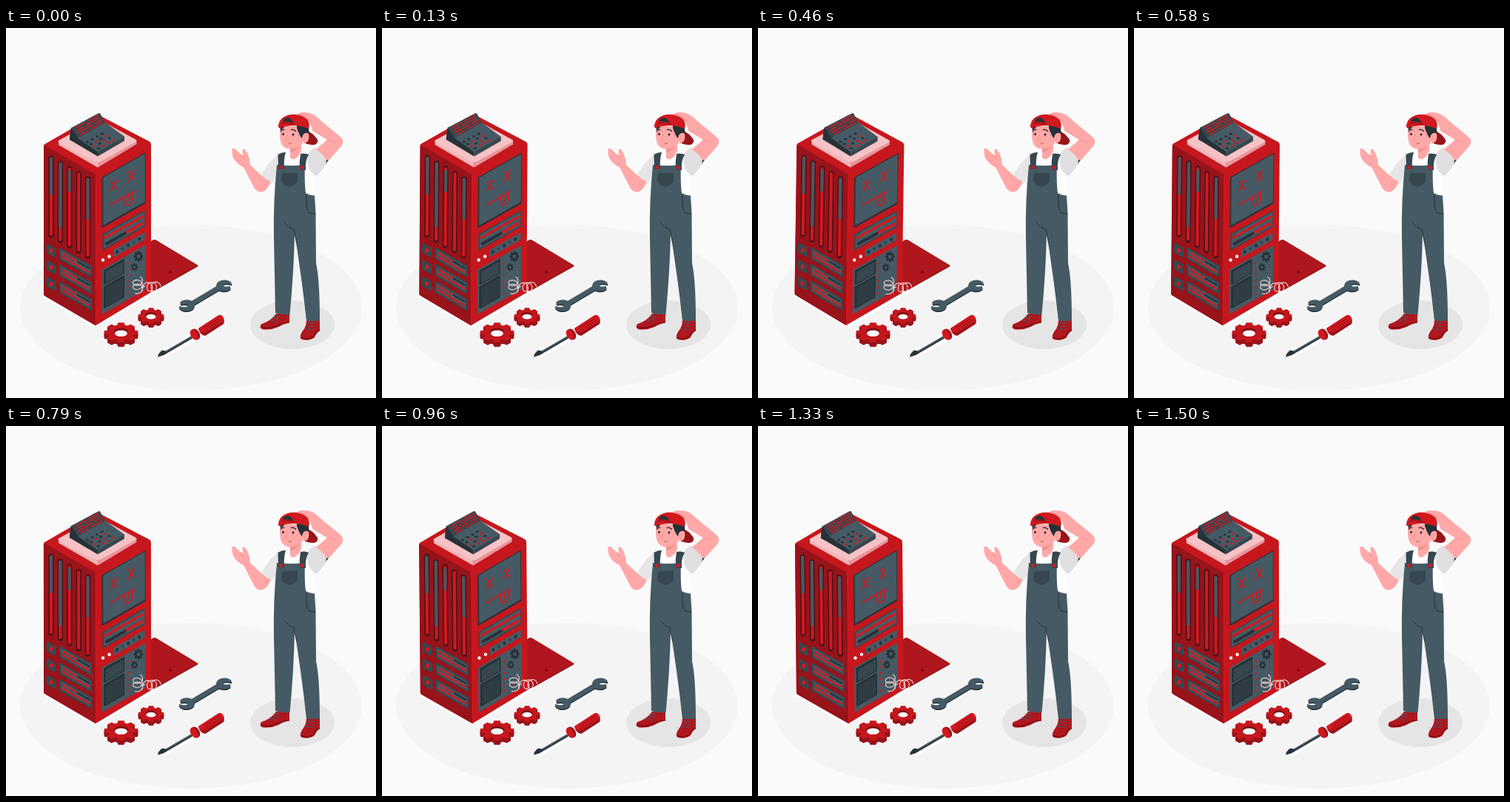
Write an HTML page that moves like this. It is 500 px wide and 500 px high and loops after 1540 ms.

```html
<!DOCTYPE html>
<html lang="en">
<head>
<meta charset="utf-8">
<title>Broken server</title>
<style>
html,body{margin:0;width:100%;height:100%;overflow:hidden;background:#fafafa}
svg{display:block;width:100vw;height:100vh}
</style>
</head>
<body>
<svg id="stage" viewBox="0 0 500 500" fill="none" stroke-linecap="round" stroke-linejoin="round"></svg>
<script>
const RED = '#d2191f', SIDE = '#c5171d', DEEP = '#98131a', WINE = '#7d0d13', SLATE = '#455a64', STEEL = '#37474f',
  INK = '#263238', SKIN = '#ffa8a7', SHADE = '#f28f8f', WIRE = '#f7d3d4', LOOP = 1540, SLOPE = 0.57;

const fill = (d, c, extra = '') => `<path d="${d}" fill="${c}" ${extra}/>`;
const line = (d, c, w = 1) => `<path d="${d}" stroke="${c}" stroke-width="${w}"/>`;
const oval = (x, y, rx, ry, c) => `<ellipse cx="${x}" cy="${y}" rx="${rx}" ry="${ry}" fill="${c}"/>`;
const dot = (x, y, r, c) => oval(x, y, r, r, c);
const range = (n, f) => Array.from({length: n}, (_, i) => f(i)).join('');

// Panels and bars lying on a side of the tower: dir 1 is the left side, -1 the right
const panel = (dir, x, y, w, h, c, r = 1) => {
  const k = dir * SLOPE * w;
  return fill(`M${x} ${y}l${w} ${k}v${h}l${-w} ${-k}z`, c, `stroke="${c}" stroke-width="${r}"`);
};
const bar = (dir, x, y, w, c, t) => line(`M${x} ${y}l${w} ${dir * SLOPE * w}`, c, t);

function cog(x, y, rx, ry, teeth, inner, turn = 0) {
  const pts = [], step = Math.PI * 2 / teeth;
  for (let i = 0; i < teeth; i++)
    [[-.34, inner], [-.22, 1], [.22, 1], [.34, inner]].forEach(([a, r]) => {
      const p = (i + a) * step + turn;
      pts.push((x + rx * r * Math.cos(p)).toFixed(1) + ' ' + (y + ry * r * Math.sin(p)).toFixed(1));
    });
  return 'M' + pts.join('L') + 'z';
}

function floorGear(x, y, rx, ry, depth, turn) {
  const shape = dy => cog(x, y + dy, rx, ry, 8, .77, turn);
  return fill(shape(depth + 1), '#fff', 'stroke="#fff" stroke-width="2"') +
    range(depth, i => fill(shape(depth - i), DEEP, `stroke="${DEEP}"`)) +
    fill(shape(0), SIDE, `stroke="${SIDE}"`) +
    oval(x, y - .5, rx * .43, ry * .43, WINE) +
    oval(x, y + 1.2, rx * .38, ry * .32, '#fafafa');
}

function coil(x, y, dx, dy, turns, rx, ry, from = 0) {
  const n = turns * 20;
  let d = '';
  for (let i = 0; i <= n; i++) {
    const a = from + i / 20 * Math.PI * 2, p = i / n;
    d += (i ? 'L' : 'M') + (x + dx * p + rx * Math.cos(a)).toFixed(1) + ' ' + (y + dy * p + ry * Math.sin(a)).toFixed(1);
  }
  return line(d, WIRE, 1.1);
}

function ground() {
  return oval(250, 378, 231, 112, '#f4f4f4') + oval(387, 401, 57, 33, '#e5e5e5') +
    line('M50 363L121 404L200 358', '#fff', 2) +
    line('M201 356L260 322', '#fff', 2) +
    fill('M150 318.500L198 287Q201 285.500 204 287.500L258 320Q261 321.500 258 323L202 354.500Q198 356.500 194 354z', WINE) +
    fill('M150 318L198 287Q201 285.500 204 287.500L258 320Q260.500 321 258 322L202 353.500Q198 355.500 194 353z', '#b0161d') +
    oval(222, 330, 2.3, 1.8, WINE);
}

function keypad() {
  const dark = [1, 4, 6, 9, 11, 12];
  return fill('M89 134Q87 136 86 151L124 173.500V167L97 148z', INK) +
    fill('M124 167L160 146V152.500L124 173.500z', STEEL) +
    fill('M96 148L133 127L160 146.500L124 167.500z', SLATE) +
    fill('M88 135L125 115.200Q126.500 114.700 127.500 116L134 128L97 149z', STEEL) +
    fill('M88 135L86 151L90 153L97 149z', INK) +
    bar(-1, 94, 135, 13, RED, 1.6) + bar(-1, 111, 125.500, 14, RED, 1.6) +
    bar(-1, 96, 138.500, 8, RED, 1.6) + bar(-1, 108, 131.500, 18, RED, 1.6) +
    bar(-1, 98, 141.500, 19, RED, 1.6) + bar(-1, 121, 128.500, 8, RED, 1.6) +
    bar(-1, 101, 144.500, 10, RED, 1.6) + bar(-1, 115, 136.500, 15, RED, 1.6) +
    range(16, i => {
      const u = i % 4, v = i >> 2;
      const c = v === 0 || dark.includes(i) ? INK : RED;
      return oval(110 + u * 6.6 + v * 5, 154 - u * 3.7 + v * 2.9, 2.1, 1.4, c);
    });
}

function leftSide() {
  // Each slot holds a dark stretch: [start, end] below the slot top
  const gaps = [[0, 51], [0, 88], [3, 33], null, [0, 56]];
  return gaps.map((g, i) => {
    const x = 61 + 12.4 * i, y = 173 + 7 * i;
    return line(`M${x} ${y + 3}V${y + 107}`, '#45141b', 7) +
      line(`M${x} ${y + 3.5}V${y + 106}`, RED, 4) +
      (g ? line(`M${x} ${y + 3.5 + g[0]}V${y + g[1]}`, SLATE, 4) : '');
  }).join('') + range(3, i => {
    const y = i * 22.5;
    return panel(1, 56, 293 + y, 10, 10, STEEL, 3) +
      oval(61, 301 + y, 2.5, 3, RED) +
      panel(1, 73, 298 + y, 42, 14, STEEL, 2) +
      panel(1, 74.5, 300.5 + y, 39, 10.5, SLATE, .5) +
      bar(1, 77, 304.500 + y, 19, RED, 2.2) + bar(1, 97, 316 + y, 15, INK, 2.2) +
      bar(1, 76, 309.500 + y, 21, RED, 2.4) + bar(1, 97, 321.500 + y, 15, RED, 2.4);
  });
}

function rightSide() {
  const face = 'M142 207l8 11M150 205l-8 15M165.500 194l7.500 11M173 192l-7.500 15' +
    'M141 239L174 220M160.500 229v7q.5 5.500 5.500 2.500q5-3 5-8v-8M166 226v7';
  return panel(-1, 130, 202, 58, 67.500, INK) +
    panel(-1, 131.500, 202, 56, 64.500, SLATE, .5) +
    line(face, RED, 1.7) +
    panel(-1, 131, 279, 56, 21, STEEL) +
    panel(-1, 132.500, 279.500, 54, 18, SLATE, .5) +
    bar(-1, 134, 283.500, 50, RED, 3.2) +
    bar(-1, 136, 291.500, 25, INK, 4) + bar(-1, 164, 275.500, 19, RED, 4) +
    dot(131, 313.500, 2.2, '#fff') + dot(139.500, 308.700, 2.2, '#fff') +
    panel(-1, 146, 300, 41, 9, SLATE) +
    range(5, i => oval(150 + i * 7.6, 302.500 - i * 4.330, 2, 2.4, i % 2 ? STEEL : INK)) +
    panel(-1, 130, 327, 58, 59, SLATE) +
    panel(-1, 133, 328, 26, 18, INK, 2) + panel(-1, 135, 329.5, 23, 14.5, STEEL) +
    panel(-1, 133, 350, 26, 28, INK, 2) + panel(-1, 135, 351.5, 23, 24.5, '#303c43') +
    range(6, i => oval(164.5, 318 + i * 8, 1.3, 1.6, RED)) +
    fill(cog(179, 308.500, 6.5, 7.5, 8, .74), INK) + oval(179, 308.500, 2.2, 2.7, SLATE) +
    fill(cog(173.500, 323, 4.7, 5.6, 8, .74), INK) + oval(173.500, 323, 1.6, 1.9, SLATE);
}

function tower() {
  return fill('M51 160Q51 157 54 156L120 118Q123 116.500 126 118L193 153Q196 154.500 196 157V357L121 402L51 361z', SIDE) +
    fill('M51 159Q51.500 158 54 159.500L121 198V402L54 363Q51 361.500 51 359z', DEEP) +
    line('M121.500 199V400', RED, 1.4) +
    fill('M71 152.500L124 182V188.500L71 158z', '#f3b4b8') +
    fill('M124 182L176.500 152V157L124 188.500z', '#e8959a') +
    fill('M72 151.500L121 124.500Q124 123 127 124.500L175 150.500Q178 152.500 175 154L127 181Q124 182.500 121 181L72 155Q69 153 72 151.500z', '#f5c3c6') +
    keypad() + leftSide() + rightSide() +
    coil(178, 340.500, 0, 14, 2.5, 6.5, 5, -1) +
    line('M184 356Q184 350 188 349', WIRE, 1.1) +
    coil(190, 350, 14, -1, 2.5, 5, 6, 3.14);
}

function screwdriver() {
  return line('M212 445L258 419L291 401', '#fff', 3) +
    line('M214 439.500L250 418.500', INK, 3.6) + line('M214 438.700L250 417.700', SLATE, 1.8) +
    fill('M216 436.500L211 435.500Q206 439 205 444.500L212 442.500L217 439.500z', INK) +
    fill('M260 406L286 389Q290 386.500 293 390Q296 395 294 400L270 415.500Q263 417 260 406z', DEEP) +
    fill('M260 406L286 389Q290 386.500 292.500 389.500Q294.500 393 293.500 396L269 411.500Q262 413 260 406z', RED) +
    line('M268 409.500L291 394.500M267 405.500L288 392', DEEP, 1.2) +
    `<g transform="rotate(-30 255 414)">${oval(256, 414.500, 5.5, 8, DEEP)}${oval(254, 414, 4.5, 7.5, RED)}</g>`;
}

function tools() {
  const head = 'M235.500 370Q240 366.500 247 367.500Q253 368.500 255 374Q255 380 248 382Q240 384 235 379.500L233.500 376Q241 378 245 376.500Q247 373.500 241.500 373.500L236 374z';
  const wrench = c => {
    const h = fill(head, c);
    return line('M251 372.500L288 350.500', c, 6.5) + h + `<g transform="rotate(180 269.500 361.500)">${h}</g>`;
  };
  return floorGear(155.500, 411.5, 22.500, 13, 6, 0) + floorGear(196, 389, 17, 10.5, 5, 0) +
    `<g transform="translate(1 3)">${wrench('#fff')}</g>` +
    `<g transform="translate(0 1.5)">${wrench(INK)}</g>` + wrench(SLATE) + screwdriver();
}

function shoes() {
  const c = '#b0161d';
  return fill('M365 386L383 386V398Q374 400 368 404Q357 409 346 407Q342 404 345 400Q358 396 365 386z', c) +
    line('M344.500 404Q354 407.500 367 402Q374 399 382.500 397.500', WINE, 1.6) +
    line('M358 394l7 4M362 391l6 3.500M365 388l5 3', SLATE, 1.2) +
    fill('M406 395H424V409Q420 411 417 418Q409 424 399 420.500Q396 415 402 408Q406 402 406 395z', c) +
    line('M398.500 418.500Q409 422.500 416 416.500Q419 410.500 423.500 408.500', WINE, 1.6) +
    line('M404 406l11 1.500M407 402l10 1.500M408 398.500l9 1', SLATE, 1.2);
}

function clothes() {
  return fill('M371 174Q379 167 386 167H400Q412 166 418 174L416 200L418 228H370z', '#fff') +
    fill('M369 171Q357 177 344 200Q349 208 357 212L368 199z', '#e6e6e6') +
    fill('M408 170Q414 161 420 162Q432 169 437 177Q430 189 420 200Q410 196 408 184z', '#e0e0e0') +
    fill('M366 185Q385 187 404 185Q403 208 405 223Q411 227 417 226L418.500 250L419 318Q424 340 424 395.500Q415 397 406 395.500Q400 340 390 277Q389 330 383.500 387.500Q373 388 364 385Q363 330 362 285Q361 235 366 185z', SLATE) +
    line('M377 264Q382 270 389 272.500Q391 283 392.500 290', INK, 1) +
    line('M406 226Q405 246 410 250Q414 251.500 418 251', INK, 1) +
    fill('M372.500 196H394V208Q390 213 383.500 215Q376 213 372.500 208z', STEEL) +
    fill('M367.500 171Q372 168 378 168Q375 177 376 191H368z', STEEL) +
    fill('M398 170Q404 168.500 409 171Q404 180 405 192H397Q396 181 398 170z', STEEL) +
    dot(371.500, 188.500, 2.5, RED) + dot(400, 188.500, 2.5, RED);
}

function head() {
  return fill('M384 160L399 155V166Q395 177 387 177.500Q383 177 384 169z', SKIN) +
    fill('M384 163Q392 163 397 158Q393 167 384 168z', SHADE) +
    fill('M404 138Q415 141 421 151Q422 155 418 157.500Q410 159 403 155z', DEEP) +
    fill('M371 131Q368 148 373 158Q378 165 388 163Q397 161 401 155L403 134z', SKIN) +
    fill('M393 131L409 134L409.500 144Q403 140 401 147L399.500 149Q396 144 393 135z', INK) +
    fill('M370 131L377 132Q375 136 371 138.500z', INK) +
    fill('M401 145Q405 139.500 409 143Q411 154 403 156L400 152z', SKIN) +
    line('M403 151Q404 146 407 145', SHADE, .9) +
    fill('M368 133Q369 120 384 117Q401 115 408 124Q411 131 409 136Q402 133 394 132Q380 131 369 135.500z', RED) +
    fill('M374 126.500Q375 121 381 121Q387 123 388.500 128.500Q381 125.500 374 126.500z', INK) +
    line('M373 129Q381 126.500 390 130.500', DEEP, 1.4) +
    oval(374.500, 143.500, 1.4, 1.8, INK) + oval(388, 144, 1.4, 1.8, INK) +
    line('M371.500 139.500Q373 137 376 137.500M385.500 137.500Q389 136.500 391.500 139.500', INK, 1.4) +
    line('M380 144L378 151L381 151.500', SHADE, 1) +
    line('M382 156.500Q383.500 155 385.500 156', '#b5464b', .9);
}

function arms() {
  return fill('M305.500 164Q306 161.500 309 163L317 170.500L320.500 172Q318.500 164 321 163Q324 164 327 171Q330 178 330 185L346 200L357 208.500Q354 219 346 221.500Q340 222.500 336 217L321 188Q311 184 306.500 174Q305 169 305.500 164z', SKIN) +
    line('M317 171Q320 174 322 178', SHADE, .9) +
    line('M348 213Q354 211 356 206', SHADE, .9) +
    fill('M392 117Q397 112.500 409 114.500Q418 117 424 124L453 148Q458 152.500 453 160L434 181Q431 172 419 164L434 151L414 139Q413 131 408 124Q401 118 392 117z', SKIN) +
    line('M434 151Q441 152 446 155', SHADE, 1) +
    line('M397 117Q407 119 411 125', SHADE, .9) +
    fill('M433 178L435.500 179L432 183z', INK);
}

document.getElementById('stage').innerHTML =
  ground() + `<g id="tower">${tower()}</g>` + tools() + shoes() + clothes() + head() + arms();

const box = document.getElementById('tower');

// Steady rocking: 0 up to 1 degree, down to -1, back to 0
function draw(ms) {
  const p = (ms % LOOP) / LOOP;
  const deg = p < .25 ? p * 4 : p < .75 ? 2 - p * 4 : p * 4 - 4;
  box.setAttribute('transform', `rotate(${deg.toFixed(4)} 130.5 258.5)`);
}

const start = performance.now();
function tick() {
  draw(performance.now() - start);
  requestAnimationFrame(tick);
}
draw(0);
requestAnimationFrame(tick);
</script>
</body>
</html>
```
